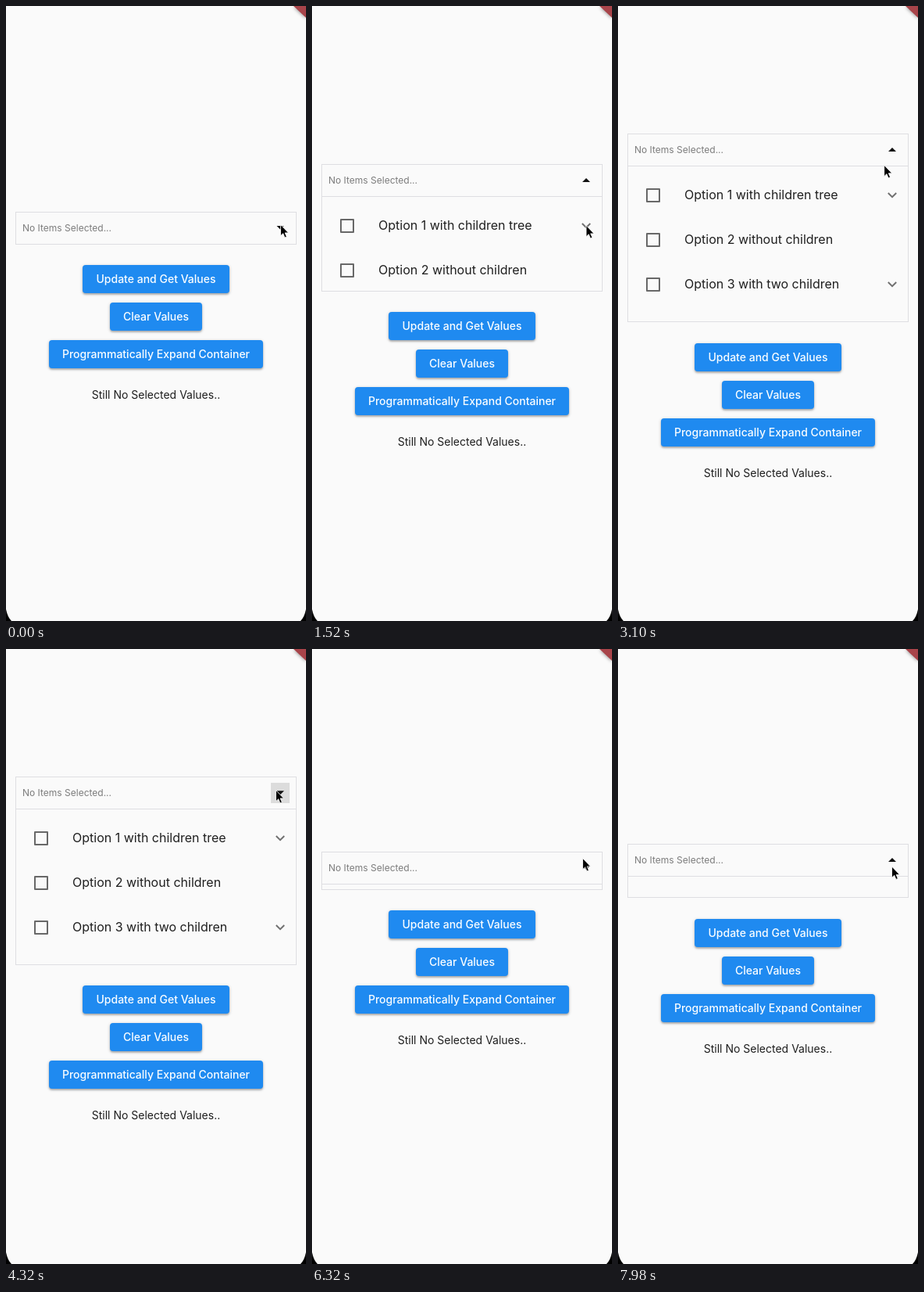
An HTML page that plays this animation: 384x786 px, repeating every 8000 ms.

```html
<!DOCTYPE html>
<html lang="en">
<head>
<meta charset="utf-8">
<title>Tree dropdown</title>
<style>
html, body { margin: 0; width: 100%; height: 100%; overflow: hidden; background: #fafafa; }
/* --open is half of the open height: the box grows by this much both ways. */
main {
  --open: 0px;
  position: relative; width: 384px; height: 786px; overflow: hidden;
  background: #fafafa; color: #1f1f1f;
  font: 14px/20px Inter, "Open Sans", sans-serif;
}
main * { position: absolute; box-sizing: border-box; white-space: nowrap; }
svg { overflow: visible; }
svg * { position: static; }

#tree {
  left: 12px; top: calc(262.5px - var(--open)); width: 360px;
  height: calc(42px + 2 * var(--open));
  border: 1px solid #dedee2;
}
#head { left: 0; top: 0; width: 358px; height: 41px; border-bottom: 1px solid #dedee2; }
#head span { left: 8px; top: 10px; font-size: 12px; color: #7c7c7c; }
#splash { left: 326px; top: 7px; width: 24px; height: 26px; background: #dcdcdc; }
#arrow {
  left: 333px; top: 17px; width: 10px; height: 5px; background: #111;
  clip-path: polygon(0 0, 100% 0, 50% 100%);
}
#list { left: 0; top: 41px; bottom: 8px; width: 358px; overflow: hidden; }
.row { left: 0; width: 358px; height: 57px; font-size: 16px; line-height: 57px; }
.row span { left: 72px; top: 0; }
.row i { left: 23px; top: 20px; width: 18px; height: 18px; border: 2px solid #686868; border-radius: 1px; }
.row svg { left: 332px; top: 25px; }

#below { left: 0; top: var(--open); width: 384px; height: 786px; }
.button {
  height: 36px; border-radius: 4px; background: #1f8af0; color: #fafdff;
  font-weight: 500; line-height: 36px; text-align: center;
  box-shadow: 0 2px 2px #0003, 0 1px 4px #0003;
}
#status { left: 0; top: 487px; width: 384px; text-align: center; }
#cursor { left: 0; top: 0; }
</style>
</head>
<body>
<main>
  <div id="tree">
    <div id="head"><div id="splash"></div><span>No Items Selected...</span><div id="arrow"></div></div>
    <div id="list"></div>
  </div>
  <div id="below">
    <div class="button" style="left:98px;top:331px;width:188px">Update and Get Values</div>
    <div class="button" style="left:133px;top:379px;width:118px">Clear Values</div>
    <div class="button" style="left:55px;top:427px;width:274px">Programmatically Expand Container</div>
    <div id="status">Still No Selected Values..</div>
  </div>
  <svg style="left:0;top:0" width="384" height="786">
    <path d="M368 0H384V15Z" fill="#a8444a" style="filter:drop-shadow(0 1px 2px #0006)"/>
    <path d="M0 771Q2 781 7 786H0ZM384 771Q382 781 377 786H384Z"/>
  </svg>
  <svg id="cursor" width="12" height="18">
    <path d="M0 0V14.2L3.2 11.2L5.4 16.4L7.8 15.4L5.6 10.4H10Z" fill="#000" stroke="#fff" stroke-width=".8"/>
  </svg>
</main>
<script>
const LOOP = 8000, OPEN_HEIGHT = 99.5;
const [main] = document.getElementsByTagName("main");
const byId = id => document.getElementById(id);

const options = [
  ["Option 1 with children tree", true],
  ["Option 2 without children", false],
  ["Option 3 with two children", true]
];
const chevron = '<svg width="12" height="8"><path d="M.8 1L6 6.2L11.2 1" fill="none" stroke="#707070" stroke-width="2"/></svg>';
byId("list").innerHTML = options.map(([label, nested], i) =>
  `<div class="row" style="top:${8 + 57 * i}px"><i></i><span>${label}</span>${nested ? chevron : ""}</div>`
).join("");

// Taps on the arrow and cursor stops [tick, x, y], all counted in ticks.
const taps = [10.4, 91, 160.5];
const stops = [
  [1, 351.5, 279.5], [33, 351, 280.5], [49, 340.5, 204.5], [66, 340.5, 204.5],
  [82, 345.5, 180.5], [119, 345.5, 180.5], [134, 346.5, 267.5],
  [138, 346.5, 267.5], [152, 350.5, 278]
];

const clamp = v => Math.min(1, Math.max(0, v));
const smooth = v => v * v * (3 - 2 * v);

// cubic-bezier(.4, 0, .2, 1), solved by bisection
function ease(x) {
  let low = 0, high = 1;
  for (let i = 0; i < 20; i++) {
    const u = (low + high) / 2, v = 1 - u;
    if (1.2 * u * v * v + .6 * u * u * v + u ** 3 < clamp(x)) low = u;
    else high = u;
  }
  return smooth((low + high) / 2);
}

// Uneven cadence: three ticks every 140 ms, lasting 20, 20 and 100 ms.
function tickAt(ms) {
  const shifted = ms + 20, phase = shifted % 140;
  return 3 * Math.floor(shifted / 140) + Math.min(2, Math.floor(phase / 20));
}

function cursorAt(tick) {
  const next = stops.findIndex(stop => stop[0] > tick);
  if (next < 0) return stops[stops.length - 1].slice(1);
  const [t0, x0, y0] = stops[next - 1], [t1, x1, y1] = stops[next];
  const k = smooth((tick - t0) / (t1 - t0));
  return [x0 + (x1 - x0) * k, y0 + (y1 - y0) * k];
}

function draw(now) {
  const tick = tickAt(now % LOOP);
  const since = taps.map(tap => tick - tap);
  const open = ease(since[0] / 57) - ease(since[1] / 60) + ease(since[2] / 57);
  const expanding = since.filter(t => t >= 0).length % 2;
  const splash = Math.max(...since.map(t => clamp((t + 5) / 2) * clamp((11 - t) / 7)));
  const [x, y] = cursorAt(tick);

  main.style.setProperty("--open", `${(OPEN_HEIGHT * open).toFixed(2)}px`);
  byId("arrow").style.transform = expanding ? "scaleY(-1)" : "none";
  byId("splash").style.opacity = splash;
  byId("cursor").style.transform = `translate(${x}px, ${y}px)`;
}

function loop() {
  draw(performance.now());
  requestAnimationFrame(loop);
}
loop();
</script>
</body>
</html>
```
